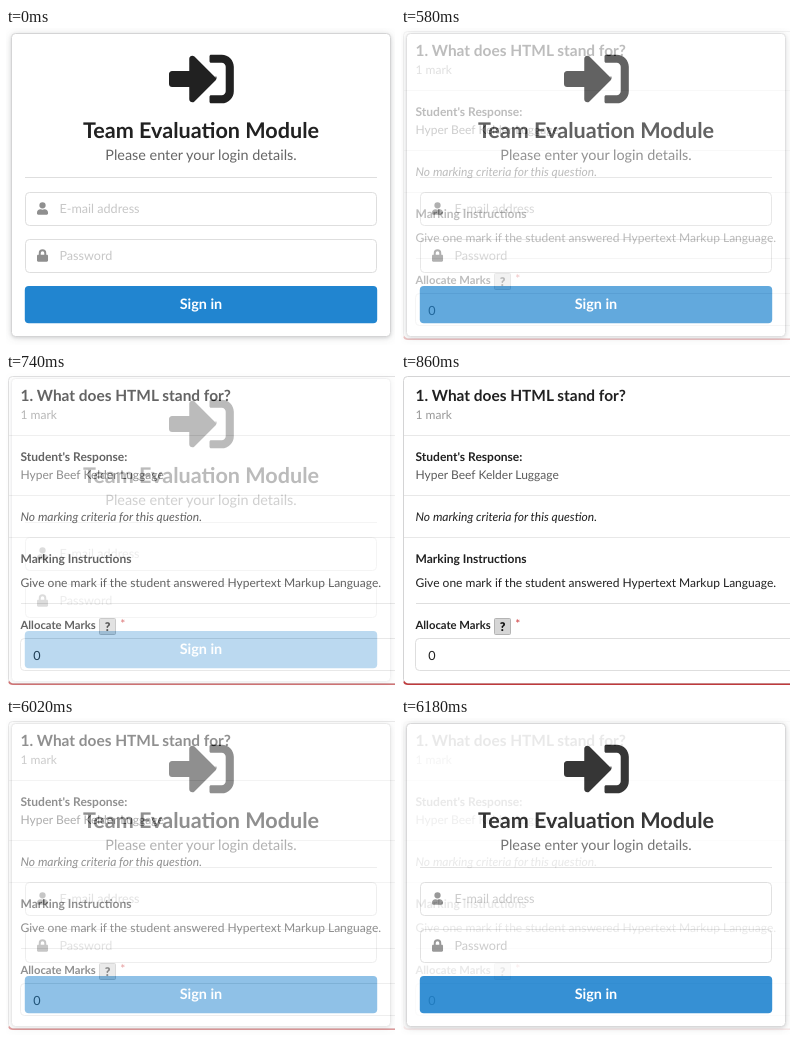
An HTML page that plays this animation: 389x317 px, repeating every 6.22 s.

```html
<!DOCTYPE html>
<html lang="en">
<head>
<meta charset="utf-8">
<title>Sign in and mark</title>
<style>
  html, body { margin: 0; width: 100%; height: 100%; overflow: hidden; background: #fff; }
  svg { display: block; font: 12.02px Lato, sans-serif; text-rendering: geometricPrecision; }
  text { fill: #212121; }
  .b { font-weight: 700; }
  .mid { text-anchor: middle; }
  .line { fill: none; stroke: #dedede; }
  .box { fill: #fff; stroke: #dedede; }
  .hint { font-size: 12.6px; fill: #c7c7c7; }
  .icon { fill: #8f8f8f; }
  .card { fill: #fff; stroke: #d4d4d5; }
  .raised { filter: drop-shadow(0 1.8px 1.8px rgba(34,36,38,.12)) drop-shadow(0 1.8px 4.5px rgba(34,36,38,.13)); }
</style>
</head>
<body>
<svg width="389" height="317" viewBox="0 0 389 317">
  <g id="question">
    <rect class="card" x="2.5" y="3.5" width="400" height="307" rx="4"/>
    <path d="M3 308.5Q3.5 311.2 7 311.2H389" fill="none" stroke="#bf3a3c" stroke-width="1.5"/>
    <path class="line" style="stroke:#e8e8e8" d="M3 62.5H389M3 122.5H389M3 164.5H389"/>
    <path class="line" d="M15 230.5H389"/>

    <text class="b" x="14.5" y="28" font-size="15.45">1. What does HTML stand for?</text>
    <text x="14.5" y="46" style="fill:#999">1 mark</text>
    <text class="b" x="14.5" y="88">Student's Response:</text>
    <text x="14.5" y="106" style="fill:#5c5c5c">Hyper Beef Kelder Luggage</text>
    <text x="14.5" y="148" font-style="italic">No marking criteria for this question.</text>
    <text class="b" x="14.5" y="190">Marking Instructions</text>
    <text x="14.5" y="214">Give one mark if the student answered Hypertext Markup Language.</text>

    <text class="b" x="14.5" y="256" font-size="11.27">Allocate Marks</text>
    <rect x="93.5" y="245.5" width="16" height="16" rx="1" fill="#d6d6d6" stroke="#b4b4b4"/>
    <text class="mid" x="101.5" y="257.5" font-weight="900" style="fill:#111">?</text>
    <text class="mid" x="116.7" y="255" style="fill:#cf3c3e">*</text>
    <rect class="box" x="14.5" y="265.5" width="400" height="32" rx="4"/>
    <text x="27.3" y="286.5" font-size="12.6">0</text>
  </g>

  <g id="form">
    <rect width="389" height="317" fill="#fff"/>
    <rect class="card raised" x="5.5" y="5.5" width="379" height="303" rx="4"/>
    <path transform="translate(163 18.6) scale(.1266)" fill="#212121" d="M416 448h-84c-6.6 0-12-5.4-12-12v-40c0-6.6 5.4-12 12-12h84c17.7 0 32-14.3 32-32V160c0-17.7-14.3-32-32-32h-84c-6.6 0-12-5.4-12-12V76c0-6.6 5.4-12 12-12h84c53 0 96 43 96 96v192c0 53-43 96-96 96zm-47-201L201 79c-15-15-41-4.5-41 17v96H24c-13.3 0-24 10.7-24 24v80c0 13.3 10.7 24 24 24h136v96c0 21.5 26 32 41 17l168-168c9.3-9.4 9.3-24.6 0-34z"/>
    <text class="b mid" x="195" y="110" font-size="21.6">Team Evaluation Module</text>
    <text class="mid" x="195" y="132" font-size="14.4" style="fill:#666">Please enter your login details.</text>
    <path class="line" d="M19 149.5H371"/>

    <rect class="box" x="19.5" y="164.5" width="351" height="33" rx="4"/>
    <path class="icon" transform="translate(31 174.2) scale(.0246)" d="M224 256a128 128 0 1 0 0-256a128 128 0 1 0 0 256zm89.6 32h-16.7c-22.2 10.2-46.9 16-72.9 16s-50.6-5.8-72.9-16h-16.7C60.2 288 0 348.2 0 422.4V464c0 26.5 21.5 48 48 48h352c26.5 0 48-21.5 48-48v-41.6c0-74.2-60.2-134.4-134.4-134.4z"/>
    <text class="hint" x="53.5" y="185">E-mail address</text>

    <rect class="box" x="19.5" y="211.5" width="351" height="33" rx="4"/>
    <path class="icon" transform="translate(31 221.2) scale(.0246)" d="M400 224h-24v-72a152 152 0 0 0-304 0v72H48c-26.5 0-48 21.5-48 48v192c0 26.5 21.5 48 48 48h352c26.5 0 48-21.5 48-48V272c0-26.5-21.5-48-48-48zm-104 0H152v-72a72 72 0 0 1 144 0z"/>
    <text class="hint" x="53.5" y="232">Password</text>

    <rect x="18.8" y="258" width="352.4" height="37.3" rx="4" fill="#2185d0"/>
    <text class="b mid" x="195" y="281" font-size="14.4" style="fill:#fff">Sign in</text>
  </g>
</svg>
<script>
  const LOOP = 6220, STEP = 40, STEPS = 10;
  const form = document.getElementById('form');

  // Fraction of a stepped fade that begins at the given time
  const fade = (t, start) =>
    Math.min(STEPS, Math.max(0, Math.floor((t - start) / STEP) + 1)) / STEPS;

  function draw(now) {
    const t = now % LOOP;
    form.style.opacity = 1 - fade(t, 500) + fade(t, 5860);
    requestAnimationFrame(draw);
  }
  requestAnimationFrame(draw);
</script>
</body>
</html>
```
